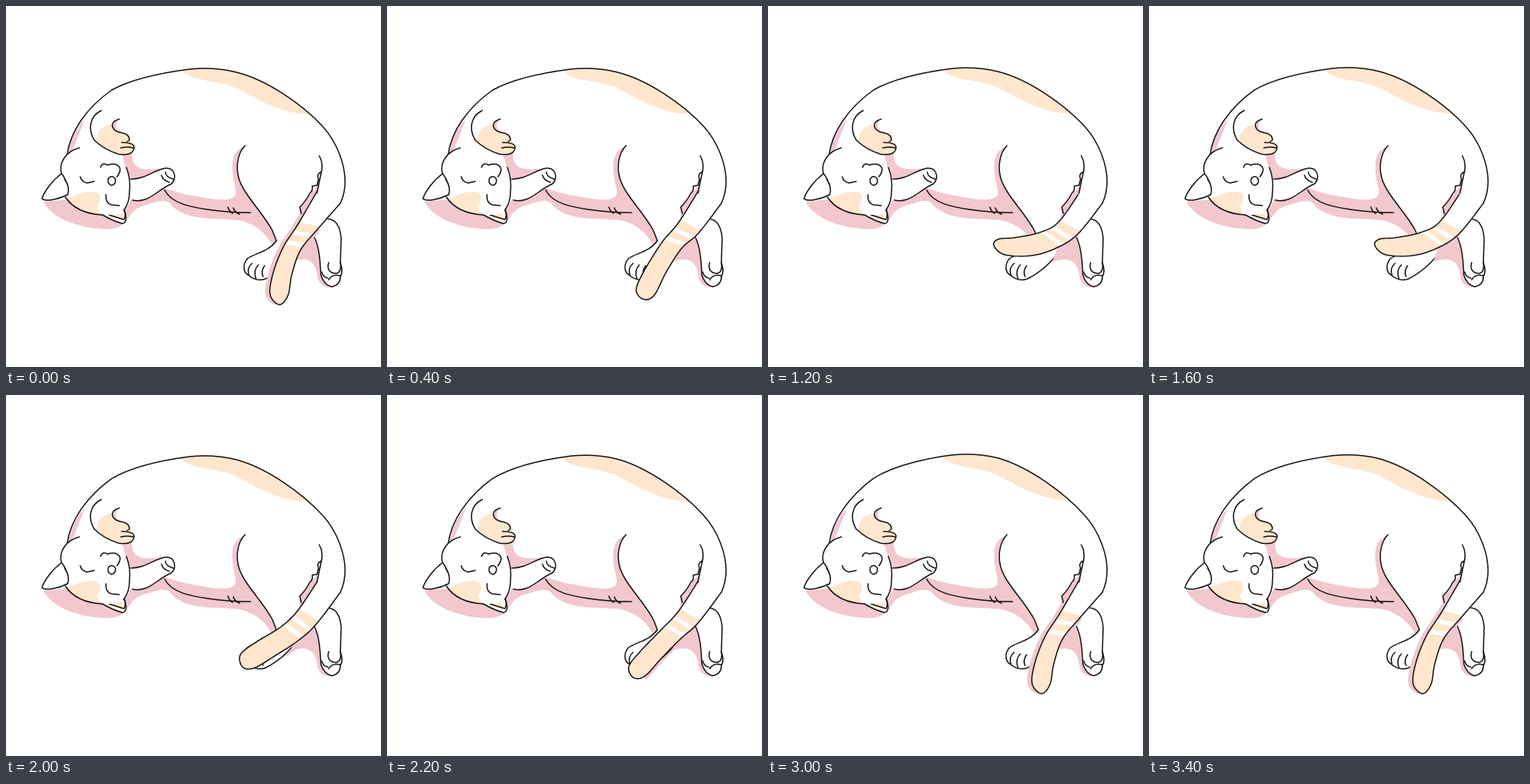
Write an HTML page with a canvas that moves like this. It is 480 px wide and 463 px high and loops after 3.6 s.

```html
<!DOCTYPE html>
<html lang="en">
<head>
<meta charset="utf-8">
<title>Sleeping cat</title>
<style>
  html, body { margin: 0; width: 100%; height: 100%; overflow: hidden; background: #fff; }
  canvas { display: block; }
</style>
</head>
<body>
<canvas id="stage" width="480" height="463"></canvas>
<script>
const ctx = document.getElementById('stage').getContext('2d');
const PINK = '#f2c7cd', ORANGE = '#ffe6cd', INK = '#111', WHITE = '#fff';
const STEP = 200, STEPS = 18;

// Tail outlines: left edge, tip, then right edge back to the body.
const TAILS = [
  [398,238, 373,281, 355,309, 342,342, 338,370, 350,383, 361,371, 366,344, 377,313, 399,286, 428,253],
  [398,238, 374,281, 355,305, 337,340, 330,372, 341,385, 354,372, 360,343, 377,311, 399,287, 428,253],
  [398,238, 373,278, 352,303, 329,340, 319,364, 328,376, 342,371, 357,342, 377,311, 399,291, 428,253],
  [398,240, 373,277, 351,298, 320,317, 300,333, 303,349, 318,350, 345,334, 374,315, 397,294, 428,253],
  [397,242, 371,278, 346,291, 316,297, 295,299, 289,307, 303,319, 338,320, 370,310, 397,292, 428,253]
];
const SHADOW_SHIFT = [[-6, 0], [-6, 0], [-2, 3], [5, 6], [6, 8]];
const SWING = [0, 1, 2, 2.5, 3, 3.5, 4, 4.25, 4, 3.5, 3, 2.5, 2, 1, 0, 0, 0, 0];
const BREATH = [0, 0, 0, .2, .3, .5, .8, .8, 1, 1.5, 2, 2.8, 3.2, 3.5, 3.5, 4, 3.8, 3.2];

function fill(path, color) {
  ctx.fillStyle = color;
  ctx.fill(typeof path === 'string' ? new Path2D(path) : path);
}
function line(path) {
  ctx.stroke(typeof path === 'string' ? new Path2D(path) : path);
}
function shape(path, color = WHITE) {
  fill(path, color);
  line(path);
}
function mix(list, k) {
  const i = Math.min(list.length - 2, Math.floor(k));
  return list[i].map((v, n) => v + (list[i + 1][n] - v) * (k - i));
}

// Catmull-Rom position along a chain of x, y pairs.
function along(chain, t) {
  const last = chain.length / 2 - 1;
  const i = Math.min(last - 1, Math.floor(t)), f = t - i;
  return [0, 1].map(axis => {
    const at = n => chain[2 * Math.max(0, Math.min(last, n)) + axis];
    const a = at(i - 1), b = at(i), c = at(i + 1), d = at(i + 2);
    return b + f * ((c - a) / 2 + f * (a - 2.5 * b + 2 * c - d / 2 + f * (1.5 * (b - c) + (d - a) / 2)));
  });
}
function trace(path, chain, from, to) {
  for (let i = 0; i <= 40; i++) path.lineTo(...along(chain, from + (to - from) * i / 40));
}
function tailBand(chain, from, to) {
  const path = new Path2D();
  trace(path, chain, from, to);
  trace(path, chain, 10 - to, 10 - from);
  path.closePath();
  return path;
}

function back(lift) {
  const y = (v, part = 1) => v - lift * part;
  return new Path2D(`M78,192 C82,160 104,130 135,${y(108, .3)}
    C165,${y(91, .7)} 212,${y(84)} 235,${y(81)} C255,${y(79)} 275,${y(80)} 295,${y(85)}
    C335,${y(95, .6)} 380,${y(127, .2)} 405,154 C425,176 434,205 434,225 Q434,240 428,253`);
}

function drawBody(lift) {
  const outline = back(lift);
  ctx.save();
  ctx.clip(outline);
  ctx.translate(-lift / 2, -lift * .8);
  fill('M222,74 L225,83 C239,98 268,94 294,105 C322,119 350,138 390,139 L405,145 L360,90 L290,70 Z', ORANGE);
  ctx.restore();

  fill('M79,190 Q83,164 101,145 Q93,166 84,188 Z', PINK);
  fill(`M48,251 L80,248 L150,268 L160,248 L205,234 C218,239 235,243 255,246 C280,250 296,250 294,236
    C287,205 287,187 305,180 C296,192 295,209 297,219 C303,240 327,263 341,288 L346,301 L343,311
    C334,292 320,280 300,275 C270,271 235,277 213,257 C206,244 190,252 176,256
    C153,263 160,283 134,286 C95,287 58,272 48,251 Z`, PINK);
  fill('M148,188 L161,189 C161,208 172,212 200,208 L182,221 L158,224 Z', PINK);
  fill('M403,214 L399,231 L392,238 L376,259 L375,277 L398,246 Z', PINK);
  line(outline);
  line('M203,236 C212,254 238,258 258,261 Q285,265 313,265 M284,258 Q286,264 290,266 M291,259 Q293,265 299,267');
}

function drawHead() {
  shape('M122,267 Q137,276 149,279 Q157,278 151,260');
  fill('M132,269 Q145,276 150,274 L148,265 Z', ORANGE);
  line('M151,261 Q154,268 151,274 L132,268');
  fill('M94,182 C75,186 67,203 73,220 Q80,232 77,245 C86,260 104,267 122,268 L145,267 C158,259 162,223 154,207 L140,189 Z', WHITE);
  fill('M79,247 C90,243 102,236 116,239 C124,244 120,253 116,257 Q118,264 124,267 C103,268 86,260 79,247 Z', ORANGE);
  shape('M71,215 C59,224 49,238 46,247 C51,252 69,247 79,242 Q82,232 75,222');
  line('M94,182 C77,186 67,201 71,215 Q74,218 77,225 M76,245 C87,262 105,267 124,268');
  line('M154,207 Q160,222 158,239 Q158,252 151,262');
  line('M95,219 Q97,226 104,227 L113,225 M128,242 Q127,253 135,255 L145,256');
  line('M121,207 Q123,200 130,204 Q135,202 140,203 Q151,207 142,219');
  shape('M131,221 Q136,216 140,222 Q141,229 135,230 Q129,228 131,221 Z');
}

function drawArms() {
  shape('M160,222 C179,222 190,210 204,208 C216,207 219,220 212,228 C198,234 188,245 178,248 Q169,251 162,249');
  line('M199,217 Q201,224 209,226 M204,213 Q204,219 214,222');
  fill('M122,134 C106,142 105,159 113,172 Q124,184 144,190 L161,189 L164,176 L157,166 L143,160 Q134,150 141,145 Z', WHITE);
  fill('M116,168 Q121,153 134,152 Q139,161 157,165 L158,172 L164,178 L162,189 Q139,193 116,174 Z', ORANGE);
  fill('M144,146 Q133,147 137,157 L144,162 Q137,153 144,146 Z', PINK);
  line('M122,134 C106,142 105,159 113,172 Q125,184 144,190 Q163,193 164,181 Q163,175 148,175');
  line('M145,145 Q132,149 138,158 Q142,162 150,163 Q158,165 158,172 L155,174 M147,182 Q155,180 163,182');
}

function drawLeftLeg() {
  fill('M346,301 C337,315 318,317 309,324 C303,331 303,341 310,345 Q320,354 332,350 C350,341 368,325 379,304 L372,285 Z', WHITE);
  line('M306,179 C296,189 294,207 298,221 C304,242 329,265 341,288 L346,301');
  line('M346,301 C337,315 318,317 309,324 C303,331 303,341 310,345 Q320,354 332,350 C350,341 368,325 379,304');
  line('M315,330 Q308,336 311,345 M323,332 Q316,339 320,350 M331,333 Q326,340 329,347');
}

function drawRightLeg() {
  fill('M398,282 Q365,310 365,328 C388,320 397,329 399,349 Q403,362 418,361 L410,300 Z', PINK);
  shape('M412,273 Q427,274 429,298 L428,329 Q432,341 428,347 Q428,358 417,360 Q407,358 403,345 C402,325 401,310 395,297');
  line('M413,329 C410,339 416,343 423,343 Q430,341 428,329 M404,341 Q406,348 412,349 M428,346 Q418,343 413,351');
}

function drawTailShadow(tail, swing) {
  ctx.save();
  ctx.beginPath();
  ctx.rect(330, 240, 100, 160);
  ctx.clip();
  ctx.translate(...mix(SHADOW_SHIFT, swing));
  fill(tailBand(tail, .5, 5), PINK);
  ctx.restore();
}

function drawTail(tail) {
  const outline = new Path2D();
  trace(outline, tail, 0, 5);
  trace(outline, tail, 5, 10);
  fill(outline, WHITE);
  for (const [from, to] of [[.9, 1.2], [1.38, 1.68], [1.88, 5]]) fill(tailBand(tail, from, to), ORANGE);
  line(outline);
  line('M401,192 Q407,203 403,216 L398,240 M403,213 Q397,216 400,222 L398,230 L392,231 Q393,237 389,240 Q384,250 376,258 L378,266');
}

function draw(now) {
  const step = Math.floor(now / STEP) % STEPS;
  const swing = SWING[step], tail = mix(TAILS, swing);
  ctx.fillStyle = WHITE;
  ctx.fillRect(0, 0, 480, 463);
  ctx.strokeStyle = INK;
  ctx.lineWidth = 1.5;
  ctx.lineCap = ctx.lineJoin = 'round';
  drawBody(BREATH[step]);
  drawHead();
  drawArms();
  if (swing >= 2) drawTailShadow(tail, swing);
  drawLeftLeg();
  if (swing < 2) drawTailShadow(tail, swing);
  drawRightLeg();
  drawTail(tail);
  requestAnimationFrame(draw);
}
requestAnimationFrame(draw);
</script>
</body>
</html>
```
